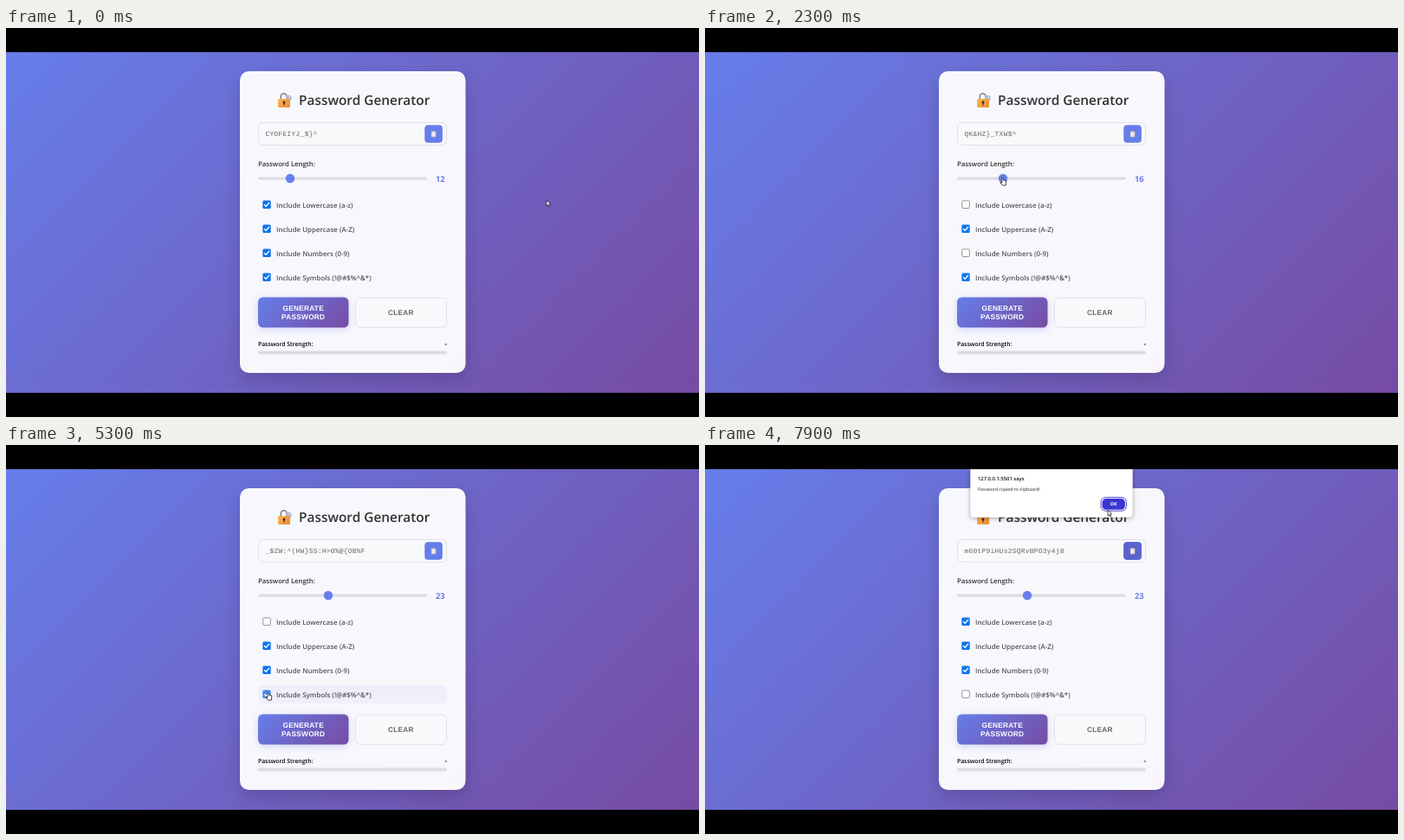
Write an HTML page with a canvas that moves like this. It is 800 by 450 pixels and loops after 8 s.

```html
<!DOCTYPE html>
<html lang="en">
<head>
<meta charset="utf-8">
<title>Password Generator</title>
<style>
html, body { margin: 0; width: 100%; height: 100%; overflow: hidden; background: #000; }
canvas { display: block; }
</style>
</head>
<body>
<canvas id="stage" width="800" height="450"></canvas>
<script>
const ctx = document.getElementById('stage').getContext('2d');
const LOOP = 8000, STEP = 100, DIALOG_AT = 7500;
const BLUE = '#667eea', PURPLE = '#764ba2';
const SANS = '"Open Sans", "Noto Sans", sans-serif';
const ARIAL = '"Liberation Sans", Arial, sans-serif';
const MONO = '"Liberation Mono", "Courier New", monospace';

const LABELS = [
  'Include Lowercase (a-z)', 'Include Uppercase (A-Z)',
  'Include Numbers (0-9)', 'Include Symbols (!@#$%^&*)'
];
const rowY = i => 204.2 + 28 * i;
const thumbX = length => 280 + 4 * length;

const PLACES = {
  rest: [624, 199], generate: [341, 323], grab: [thumbX(12), 173], drop: [thumbX(23), 173],
  between: [316, 241], above: [450, 153], copy: [494, 121], aside: [531, 138], ok: [465, 75]
};
LABELS.forEach((_, i) => PLACES['row' + i] = [302, rowY(i) - 2]);

// The pointer's tour, with arrival times
const TOUR = [
  ['rest', 0], ['row0', 850], ['row2', 1250], ['generate', 1560], ['grab', 2150],
  ['drop', 2400], ['generate', 2690], ['row2', 3500], ['between', 3950], ['row3', 4600],
  ['row0', 5750], ['generate', 6150], ['above', 7000], ['copy', 7250], ['aside', 7500], ['ok', 7880]
];

// Longer legs take longer; a stop is clicked on leaving it
const LEGS = TOUR.slice(1).map(([to, end], i) => {
  const from = TOUR[i][0], a = PLACES[from], b = PLACES[to];
  return { from, to, a, b, end, start: end - 120 - Math.hypot(b[0] - a[0], b[1] - a[1]) };
});
const DRAG = LEGS.find(leg => leg.to === 'drop');
const COPIED = LEGS.find(leg => leg.from === 'copy').start;

const PASSWORDS = [
  [0, 'CYDFEIYJ_$}^'],
  [1800, 'QK&HZ}_TXW$^'],
  [2900, '_$ZW:^(HW}SS:H>O%@{OB%F'],
  [6200, 'Tq4Zb81LkwY0sNh7VJe2Rc5'],
  [6400, 'm60tP9iHUs2SQRvBPO3y4j8']
];

const clamp = (v, lo, hi) => Math.max(lo, Math.min(hi, v));

function pointer(t) {
  const { a, b, start, end } = LEGS.findLast(leg => leg.start <= t) || LEGS[0];
  const u = clamp((t - start) / (end - start), 0, 1), e = u * u * (3 - 2 * u);
  return a.map((v, i) => v + (b[i] - v) * e);
}

// What lies under the pointer; frozen once the copy click blocks the page
function hovered(t) {
  const [x, y] = pointer(Math.min(t, COPIED));
  const within = (l, top, r, b) => x > l && x < r && y > top && y < b;
  if (within(291, 311, 396, 347)) return 'generate';
  if (within(483, 112, 504, 133)) return 'copy';
  if (within(291, 169, 486, 179)) return 'slider';
  const row = LABELS.findIndex((_, i) => within(291, rowY(i) - 8.3, 509, rowY(i) + 8.3));
  return row < 0 ? '' : 'row' + row;
}

// 300 ms hover transition
function glow(t, name) {
  let n = 0;
  for (let k = 0; k < 6; k++) n += hovered(t - k * 50) === name;
  return n / 6;
}

function diagonal(x, y, w, h) {
  const cx = x + w / 2, cy = y + h / 2, d = (w + h) / 4;
  const g = ctx.createLinearGradient(cx - d, cy - d, cx + d, cy + d);
  g.addColorStop(0, BLUE);
  g.addColorStop(1, PURPLE);
  return g;
}

function box(x, y, w, h, r, fill, stroke, lineWidth = 1) {
  ctx.beginPath();
  ctx.roundRect(x, y, w, h, r);
  if (fill) { ctx.fillStyle = fill; ctx.fill(); }
  if (stroke) { ctx.strokeStyle = stroke; ctx.lineWidth = lineWidth; ctx.stroke(); }
}

function shadowed(color, blur, dy, draw) {
  ctx.save();
  ctx.shadowColor = color;
  ctx.shadowBlur = blur;
  ctx.shadowOffsetY = dy;
  draw();
  ctx.restore();
}

function disc(x, y, r, fill) {
  ctx.beginPath();
  ctx.arc(x, y, r, 0, 7);
  ctx.fillStyle = fill;
  ctx.fill();
}

function text(s, x, y, font, color, align = 'left', spacing = 0) {
  ctx.font = font;
  ctx.fillStyle = color;
  ctx.textAlign = align;
  ctx.letterSpacing = spacing + 'px';
  ctx.fillText(s, x, y);
}

function line(points, color, width, fill) {
  ctx.beginPath();
  points.forEach(([x, y]) => ctx.lineTo(x, y));
  if (fill) { ctx.closePath(); ctx.fillStyle = fill; ctx.fill(); }
  ctx.strokeStyle = color;
  ctx.lineWidth = width;
  ctx.stroke();
}

function padlock() {
  ctx.strokeStyle = '#7f7f88';
  ctx.lineWidth = 1.5;
  ctx.beginPath();
  ctx.moveTo(317.3, 83);
  ctx.arc(320.7, 79.2, 3.4, Math.PI, 0);
  ctx.lineTo(324.1, 83);
  ctx.stroke();
  disc(326.6, 81, 3.2, '#b4b8cc');
  disc(327.6, 80, 0.9, '#e6e8f2');
  const g = ctx.createLinearGradient(314, 82, 328, 92);
  g.addColorStop(0, '#fbb74e');
  g.addColorStop(1, '#ee8838');
  box(314, 82, 14, 10, 1.5, g);
  disc(321, 86, 1.4, '#3b2a28');
  box(320.4, 86, 1.2, 3.6, 0.4, '#3b2a28');
}

function copyButton(t) {
  box(483.3, 112.3, 20.6, 20.4, 4, BLUE);
  ctx.globalAlpha = glow(t, 'copy');
  box(483.3, 112.3, 20.6, 20.4, 4, '#5a64cc');
  ctx.globalAlpha = 1;
  box(490.9, 119.4, 5.4, 6.8, 0.8, '#d9bcae');
  box(491.6, 120.2, 4, 5.3, 0.2, '#ece8f2');
  box(492.3, 118.8, 2.6, 1.5, 0.5, '#a9adc4');
}

function slider(t) {
  const x = pointer(clamp(t, DRAG.start, DRAG.end))[0];
  const length = Math.round((x - thumbX(0)) / 4);
  text('Password Length:', 291, 160.3, '600 7.75px ' + SANS, '#333');
  box(291, 172.4, 195, 3.4, 1.7, '#dcdde4');
  disc(thumbX(length), 174, 5.2, BLUE);
  text(length, 501.3, 178, '700 9.4px ' + SANS, BLUE, 'center');
}

function checkRow(label, i, t) {
  const name = 'row' + i, y = rowY(i);
  const clicks = LEGS.filter(leg => leg.from === name && leg.start <= t).length;
  const over = hovered(t) === name;
  box(291, y - 10.4, 218, 21, 5, `rgba(102,90,220,${0.06 * glow(t, name)})`);
  if (clicks % 2 === 0) {
    box(296.3, y - 4.7, 9.4, 9.4, 1.5, over ? '#3f8df0' : '#0d74ee');
    line([[298.1, y], [300.2, y + 2.1], [304, y - 2.3]], '#fff', 1.4);
  } else {
    box(296.7, y - 4.3, 8.6, 8.6, 1.4, '#fff', over ? '#555' : '#7b7b82', 0.8);
  }
  text(label, 312, y + 3.6, '600 7.95px ' + SANS, '#555');
}

function buttons(t) {
  const on = glow(t, 'generate'), y = 311.5 - on;
  const bold = '700 8.3px ' + ARIAL;
  shadowed(`rgba(102,126,234,${0.3 + 0.2 * on})`, 8 + 4 * on, 2 + on, () =>
    box(291, y, 104.5, 35, 5.5, diagonal(291, y, 104.5, 35)));
  ['GENERATE', 'PASSWORD'].forEach((word, i) =>
    text(word, 343.2, y + 15.5 + 9.5 * i, bold, '#fff', 'center', 0.25));
  box(403.4, 312, 105.2, 34.3, 5.5, '#f8f9fb', '#dfe1e8');
  text('CLEAR', 455.9, 332.2, bold, '#666', 'center', 0.25);
}

function dialog() {
  shadowed('rgba(0,0,0,.35)', 5, 1, () => box(306.3, 28, 187.4, 55.8, [0, 0, 4, 4], '#fff'));
  text('127.0.0.1:5501 says', 315, 40.6, '600 5.85px ' + SANS, '#111');
  text('Password copied to clipboard!', 315, 52.6, '400 5.13px ' + SANS, '#222');
  box(457, 60.6, 29.4, 15.6, 5.5, '#fff', '#4a45c8');
  box(458.5, 62.1, 26.4, 12.6, 4.5, '#3b35d2');
  text('OK', 471.7, 70.4, '700 5.3px ' + SANS, '#fff', 'center');
}

function cursor(t) {
  const [x, y] = pointer(t);
  const hand = t < DIALOG_AT && hovered(t);
  const shape = hand
    ? [[0, 0], [1.3, 0], [1.5, 3], [4.8, 3.8], [4.3, 9], [0.6, 9], [-2, 5.8], [0, 6]]
    : [[0, 0], [0, 6.8], [1.5, 5.5], [2.6, 8], [3.7, 7.5], [2.7, 5.1], [4.7, 5]];
  ctx.lineJoin = 'round';
  line(shape.map(p => [x + p[0], y + p[1]]), '#222', 0.8, '#fff');
}

function render(t) {
  ctx.fillStyle = '#000';
  ctx.fillRect(0, 0, 800, 450);
  ctx.save();
  ctx.beginPath();
  ctx.rect(0, 28.1, 800, 393.8);
  ctx.clip();
  const page = diagonal(0, 28, 800, 394);
  box(0, 28, 800, 394, 0, page);

  shadowed('rgba(0,0,0,.16)', 22, 8, () => box(270, 50, 260.5, 349, 10.5, page));
  box(270, 50, 260.5, 349, 10.5, 'rgba(255,255,255,.95)');

  padlock();
  text('Password Generator', 338, 89, '600 15.4px ' + SANS, '#333');

  box(291.5, 109.5, 217, 26, 5.5, '#f8f9fb', '#dfe1e8');
  const password = PASSWORDS.findLast(p => p[0] <= t)[1];
  text(password, 299.5, 125.2, '400 7.9px ' + MONO, '#666', 'left', 0.28);
  copyButton(t);

  slider(t);
  LABELS.forEach((label, i) => checkRow(label, i, t));
  buttons(t);

  text('Password Strength:', 291, 367.5, '600 6.8px ' + SANS, '#000');
  text('-', 508.8, 367.5, '700 7.5px ' + SANS, '#000', 'right');
  box(291, 373.5, 218, 4, 2, '#dcdde4');

  if (t >= DIALOG_AT) dialog();
  cursor(t);
  ctx.restore();
}

ctx.textRendering = 'geometricPrecision';

function tick() {
  const t = performance.now() % LOOP;
  render(Math.floor(t / STEP) * STEP);
  requestAnimationFrame(tick);
}
tick();
</script>
</body>
</html>
```
